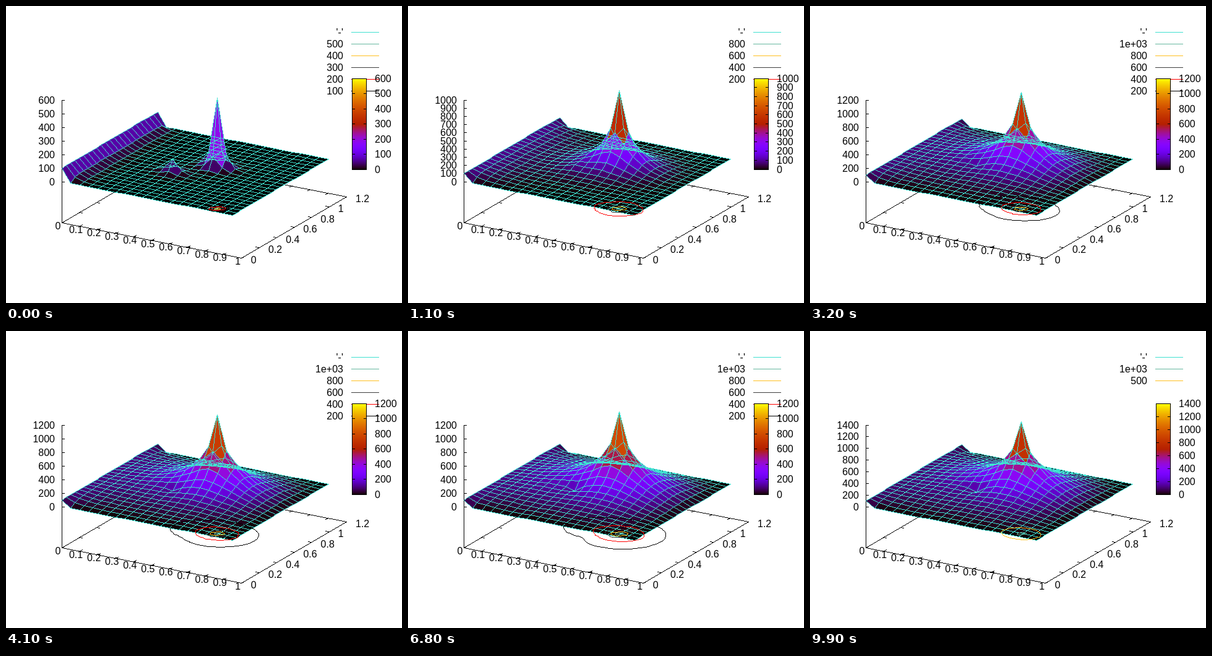
Write an HTML page with a canvas that moves like this. It is 640 by 480 pixels and loops after 10000 ms.

```html
<!DOCTYPE html>
<html lang="en">
<head>
<meta charset="utf-8">
<title>Heat diffusion on a plate</title>
<style>
  html, body { margin: 0; width: 100%; height: 100%; overflow: hidden; background: #fff; }
  canvas { display: block; }
</style>
</head>
<body>
<canvas id="stage" width="640" height="480"></canvas>
<script>
const ctx = document.getElementById('stage').getContext('2d');

const FRAMES = 100, FRAME_MS = 100;
const NX = 20, NY = 23, CELLS = NX * NY;
const SUBSTEPS = 30, RATE = 0.02;
const at = (i, j) => j * NX + i;
const HOT = at(11, 13), PIN = at(8, 9);

// Explicit diffusion: one wall and one pinned node at 100, a heater at HOT.
function simulate(power) {
  let now = new Float64Array(CELLS);
  for (let j = 0; j < NY; j++) now[at(0, j)] = 100;
  now[PIN] = 100;
  let next = now.slice();
  const history = [];
  for (let f = 0; f < FRAMES; f++) {
    for (let s = 0; s < SUBSTEPS; s++) {
      for (let j = 1; j < NY - 1; j++) {
        for (let i = 1; i < NX - 1; i++) {
          const k = at(i, j), v = now[k];
          next[k] = v + RATE * (now[k - 1] + now[k + 1] + now[k - NX] + now[k + NX] - 4 * v);
        }
      }
      next[HOT] += RATE * power;
      next[PIN] = 100;
      [now, next] = [next, now];
    }
    history.push(now.slice());
  }
  return history;
}

// The field is linear in the power, so scale it to pass 1200 at the wanted step.
function solve() {
  const step = 70, probe = 1000;
  const idle = simulate(0)[step][HOT];
  const gain = (simulate(probe)[step][HOT] - idle) / probe;
  return simulate((1199.5 - idle) / gain);
}
const history = solve();

// Projection in grid units; the floor lies 66 px below zero height.
const FLOOR = 66, HEIGHT = 132, YMAX = 24, XMAX = 20;
const project = (i, j, drop = 0) => [90 + 14.54 * i + 7.05 * j, 284 + 2.85 * i - 4.125 * j + drop];

const TURQUOISE = '#40e0d0';
const LEVEL_COLORS = ['#66b79f', '#ffc020', '#404040', '#ff0000', '#000000', '#9400d3', '#009e73', '#56b4e9'];

function heat(x) {
  x = Math.min(1, Math.max(0, x));
  const r = Math.sqrt(x), g = x ** 3, b = Math.max(0, Math.sin(2 * Math.PI * x));
  return `rgb(${[r, g, b].map(c => Math.round(c * 255)).join(',')})`;
}

// Hard-edged one pixel line
function line(a, b, color) {
  const x0 = Math.floor(a[0]), y0 = Math.floor(a[1]);
  const dx = Math.floor(b[0]) - x0, dy = Math.floor(b[1]) - y0;
  const n = Math.max(Math.abs(dx), Math.abs(dy), 1);
  ctx.fillStyle = color;
  if (!dx || !dy) {
    ctx.fillRect(Math.min(x0, x0 + dx), Math.min(y0, y0 + dy), Math.abs(dx) + 1, Math.abs(dy) + 1);
    return;
  }
  for (let k = 0; k <= n; k++) {
    ctx.fillRect(Math.round(x0 + dx * k / n), Math.round(y0 + dy * k / n), 1, 1);
  }
}

function label(text, x, y, align) {
  ctx.fillStyle = '#000';
  ctx.textAlign = align;
  ctx.fillText(text, x, y + 5.5);
}

function scaleFor(peak) {
  const top = peak <= 1000 ? Math.max(600, Math.ceil(peak / 100) * 100) : Math.ceil(peak / 200) * 200;
  return {
    top,
    tick: top <= 1000 ? 100 : 200,
    gap: top < 1000 ? 100 : top < 1400 ? 200 : 500
  };
}

function tickAt(p, dx, dy) {
  line(p, [p[0] + dx, p[1] + dy], '#000');
}

function drawAxes({ top, tick }) {
  const corner = (i, j) => project(i, j, FLOOR);
  const box = [corner(0, 0), corner(XMAX, 0), corner(XMAX, YMAX), corner(0, YMAX)];
  box.forEach((p, k) => line(p, box[(k + 1) % 4], '#000'));
  line([90, 350], [90, 152], '#000');

  for (let k = 0; k <= 10; k++) {
    const p = corner(k * 2, 0);
    tickAt(p, 4, -2);
    tickAt(corner(k * 2, YMAX), -4, 2);
    label(String(k / 10), p[0] - 6, p[1] + 5.5, 'center');
  }
  for (let k = 0; k <= 6; k++) {
    const p = corner(XMAX, k * 4);
    tickAt(p, -5, -1);
    tickAt(corner(0, k * 4), 5, 1);
    label(String(k * 2 / 10), p[0] + 15, p[1] + 3, 'left');
  }
  for (let v = 0; v <= top; v += tick) {
    const y = 284 - v / top * HEIGHT;
    tickAt([90, y], 4, 0);
    label(String(v), 79, y, 'right');
  }
}

function drawSurface(field, top) {
  const pts = [];
  for (let j = 0; j < NY; j++) {
    for (let i = 0; i < NX; i++) pts.push(project(i, j, -field[at(i, j)] / top * HEIGHT));
  }
  for (let j = NY - 2; j >= 0; j--) {
    for (let i = 0; i < NX - 1; i++) {
      const k = at(i, j), quad = [k, k + 1, k + NX + 1, k + NX];
      ctx.fillStyle = heat(quad.reduce((sum, q) => sum + field[q], 0) / 4 / top);
      ctx.beginPath();
      quad.forEach(q => ctx.lineTo(Math.floor(pts[q][0]) + 0.5, Math.floor(pts[q][1]) + 0.5));
      ctx.fill();
    }
  }
  for (let j = 0; j < NY; j++) {
    for (let i = 0; i < NX; i++) {
      const k = at(i, j);
      if (i < NX - 1) line(pts[k], pts[k + 1], TURQUOISE);
      if (j < NY - 1) line(pts[k], pts[k + NX], TURQUOISE);
    }
  }
}

function drawContour(field, level, color) {
  const cut = (a, b) => {
    const va = field[at(...a)], vb = field[at(...b)];
    if ((va > level) === (vb > level)) return null;
    const t = (level - va) / (vb - va);
    return project(a[0] + (b[0] - a[0]) * t, a[1] + (b[1] - a[1]) * t, FLOOR);
  };
  const triangle = (a, b, c) => {
    const hits = [cut(a, b), cut(b, c), cut(c, a)].filter(Boolean);
    if (hits.length === 2) line(hits[0], hits[1], color);
  };
  for (let j = 0; j < NY - 1; j++) {
    for (let i = 0; i < NX - 1; i++) {
      triangle([i, j], [i + 1, j], [i + 1, j + 1]);
      triangle([i, j], [i + 1, j + 1], [i, j + 1]);
    }
  }
}

function drawKey(levels) {
  const row = (text, y, color) => {
    label(text, 545, y, 'right');
    line([558, y], [602, y], color);
  };
  row("'-'", 42, TURQUOISE);
  levels.forEach((v, k) => row(v >= 1000 ? '1e+03' : String(v), 61 + 19 * k, LEVEL_COLORS[k]));
}

function drawColorBar({ top, tick }) {
  const x0 = 559, x1 = 582, y0 = 117, y1 = 264;
  for (let y = y0; y <= y1; y++) {
    ctx.fillStyle = heat((y1 - y) / (y1 - y0));
    ctx.fillRect(x0, y, x1 - x0 + 1, 1);
  }
  line([x0, y0], [x1, y0], '#000');
  line([x0, y1], [x1, y1], '#000');
  line([x0, y0], [x0, y1], '#000');
  line([x1, y0], [x1, y1], '#000');
  for (let v = 0; v <= top; v += tick) {
    const y = y1 - v / top * (y1 - y0);
    tickAt([x0, y], 4, 0);
    tickAt([x1, y], -4, 0);
    label(String(v), 596, y, 'left');
  }
}

function draw(frame) {
  const field = history[frame];
  const scale = scaleFor(field[HOT]);
  const levels = [];
  for (let v = scale.gap; v < scale.top; v += scale.gap) levels.unshift(v);

  ctx.fillStyle = '#fff';
  ctx.fillRect(0, 0, 640, 480);
  ctx.font = '16px "Liberation Sans", Arial, sans-serif';
  drawAxes(scale);
  drawKey(levels);
  drawSurface(field, scale.top);
  levels.forEach((v, k) => drawContour(field, v, LEVEL_COLORS[k]));
  drawColorBar(scale);
}

const start = performance.now();
let shown = -1;
function animate() {
  const frame = Math.floor((performance.now() - start) / FRAME_MS) % FRAMES;
  if (frame !== shown) draw(shown = frame);
  requestAnimationFrame(animate);
}
animate();
</script>
</body>
</html>
```
